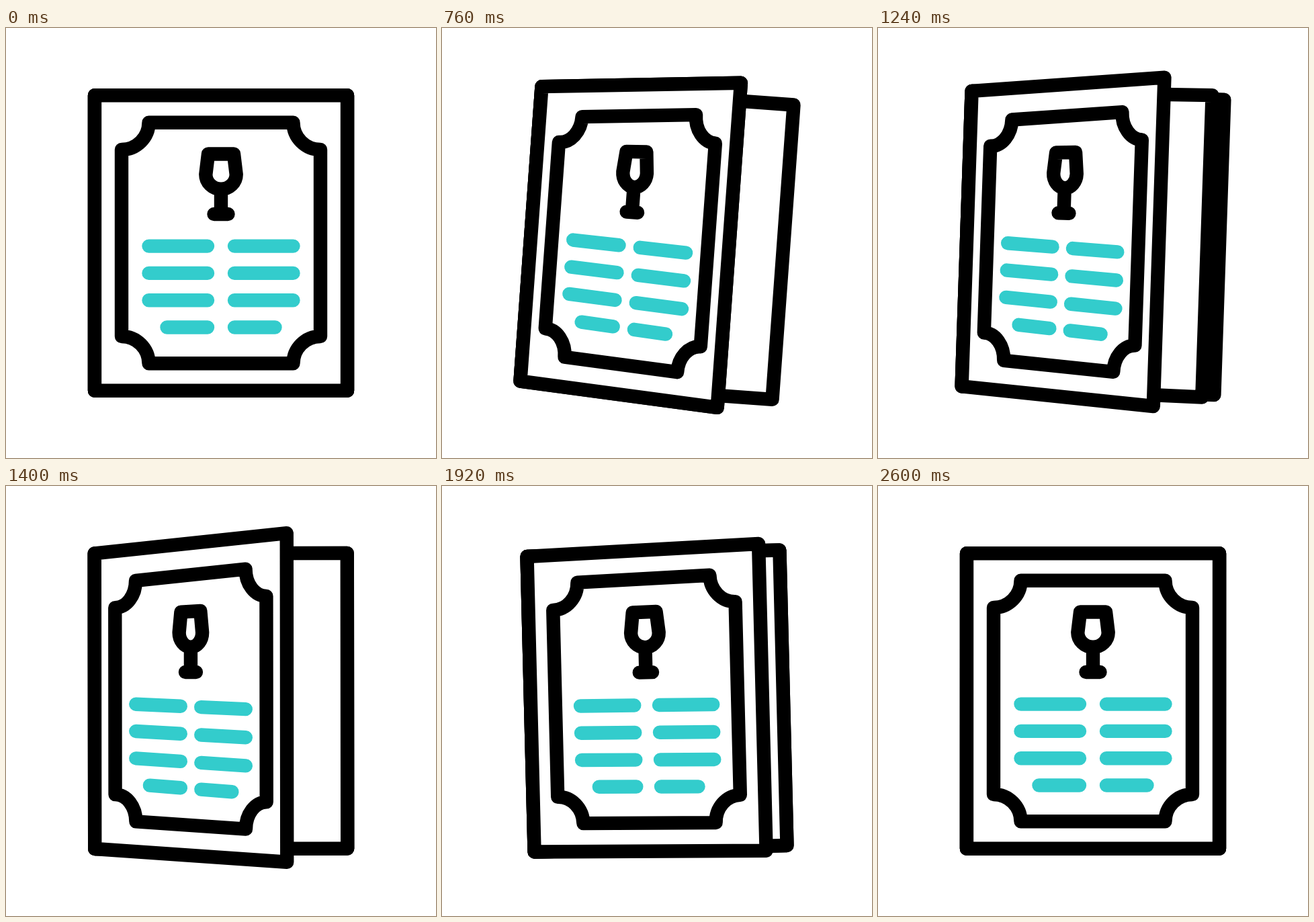
Animation of 640x640 px, one loop 3 s. Source, as an HTML page with a canvas:

```html
<!DOCTYPE html>
<html lang="en">
<head>
<meta charset="utf-8">
<title>Menu card</title>
<style>
  html, body { margin: 0; width: 100%; height: 100%; overflow: hidden; background: #fff; }
  canvas { display: block; width: 640px; height: 640px; }
</style>
</head>
<body>
<canvas id="stage" width="640" height="640"></canvas>
<script>
const ctx = document.getElementById('stage').getContext('2d');
const LOOP = 3000, STEP = 40;
const INK = '#000', TEAL = '#33cccc';
const W = 188, H = 219.8;   // half size of the card

// Keys are [ms, value]
const tilt = [[240, 0], [480, 1.17], [760, 4.17], [900, 5], [1240, 1.95], [1360, 0.4],
              [1600, -1.96], [1710, -2.3], [1920, -1.44], [2300, 0.7], [2620, 0]];
const opening = [[280, 0], [480, 0.16], [760, 0.897], [880, 1]];
const coverOpen = [...opening, [1500, 1], [1600, 0.96], [1920, 0.345], [2200, 0]];
const pageOpen = [...opening, [1240, 0.2], [1390, 0]];

// Monotone cubic interpolation: flat at the ends and at every turning point
function sample(keys, t) {
  const last = keys.length - 1;
  if (t <= keys[0][0]) return keys[0][1];
  if (t >= keys[last][0]) return keys[last][1];
  const slope = i => (keys[i + 1][1] - keys[i][1]) / (keys[i + 1][0] - keys[i][0]);
  const tangent = i => {
    if (i === 0 || i === last) return 0;
    const a = slope(i - 1), b = slope(i);
    return a * b > 0 ? 2 * a * b / (a + b) : 0;
  };
  const i = keys.findIndex(k => k[0] > t) - 1;
  const [t0, v0] = keys[i], [t1, v1] = keys[i + 1];
  const d = t1 - t0, s = (t - t0) / d, r = 1 - s;
  return v0 * r * r * (1 + 2 * s) + v1 * s * s * (3 - 2 * s)
       + d * s * r * (tangent(i) * r - tangent(i + 1) * s);
}

// Horizontal squeeze towards the spine
const squeeze = (x, p) => x - 90 * p * (x + W) / (2 * W);

function stroke(color) {
  ctx.strokeStyle = color;
  ctx.stroke();
}

function sheet(p) {
  const x = squeeze(W, p);
  ctx.beginPath();
  ctx.moveTo(-W, -H);
  ctx.lineTo(x, -H - 30 * p);
  ctx.lineTo(x, H + 20 * p);
  ctx.lineTo(-W, H);
  ctx.closePath();
  ctx.fillStyle = '#fff';
  ctx.fill();
  stroke(INK);
}

function border(p) {
  const xi = 107.5, xo = 148, yi = 139, yo = 179.3, k = 0.5523;
  const cx = xi + (xo - xi) * (1 - k) - (xo - xi) * (1 - 2 * k) * 0;
  const c = { x: xo - (xo - xi) * k, y: yo - (yo - yi) * k };
  const at = (sx, sy, x, y) => {
    const lift = sx > 0 ? (sy < 0 ? -17 : 11.4) * p : 0;
    return [squeeze(sx * x, p), sy * y + lift];
  };
  // Each corner is a concave quarter arc, drawn from or to the horizontal side
  const corner = (sx, sy, fromFlat) => {
    const pts = [[xi, yo], [xi, c.y], [c.x, yi], [xo, yi]].map(q => at(sx, sy, ...q));
    if (!fromFlat) pts.reverse();
    ctx.lineTo(...pts[0]);
    ctx.bezierCurveTo(...pts[1], ...pts[2], ...pts[3]);
  };
  ctx.beginPath();
  corner(1, -1, true);
  corner(1, 1, false);
  corner(-1, 1, true);
  corner(-1, -1, false);
  ctx.closePath();
  stroke(INK);
}

function glass(p) {
  const X = x => squeeze(x, p);
  ctx.beginPath();
  ctx.moveTo(X(-19), -132.5);
  ctx.lineTo(X(19), -132.5 - 1.7 * p);
  ctx.lineTo(X(22.7), -102);
  ctx.bezierCurveTo(X(22.7), -90, X(12.5), -80.3, X(0), -80.3);
  ctx.bezierCurveTo(X(-12.5), -80.3, X(-22.7), -90, X(-22.7), -102);
  ctx.closePath();
  ctx.moveTo(X(0), -80);
  ctx.lineTo(X(0), -43);
  ctx.moveTo(X(-10.5), -43);
  ctx.lineTo(X(10.5), -43);
  stroke(INK);
}

function textBars(p) {
  ctx.beginPath();
  for (let row = 0; row < 4; row++) {
    const y = 4.6 + 40.3 * row;
    const left = row < 3 ? -107.5 : -80.5;
    const skew = (0.035 + 0.0085 * row) * p;
    for (const [a, b] of [[left, -20], [20, -left]]) {
      ctx.moveTo(squeeze(a, p), y + skew * (a - left));
      ctx.lineTo(squeeze(b, p), y + skew * (b - left));
    }
  }
  stroke(TEAL);
}

function draw(t) {
  const p = sample(coverOpen, t);
  ctx.setTransform(1, 0, 0, 1, 0, 0);
  ctx.fillStyle = '#fff';
  ctx.fillRect(0, 0, 640, 640);
  ctx.translate(320, 320);
  ctx.rotate(sample(tilt, t) * Math.PI / 180);
  ctx.lineWidth = 20.4;
  ctx.lineCap = ctx.lineJoin = 'round';
  sheet(0);
  sheet(sample(pageOpen, t));
  sheet(p);
  border(p);
  glass(p);
  textBars(p);
}

const start = performance.now();
function tick() {
  const t = (performance.now() - start) % LOOP;
  draw(t - t % STEP);
  requestAnimationFrame(tick);
}
tick();
</script>
</body>
</html>
```
